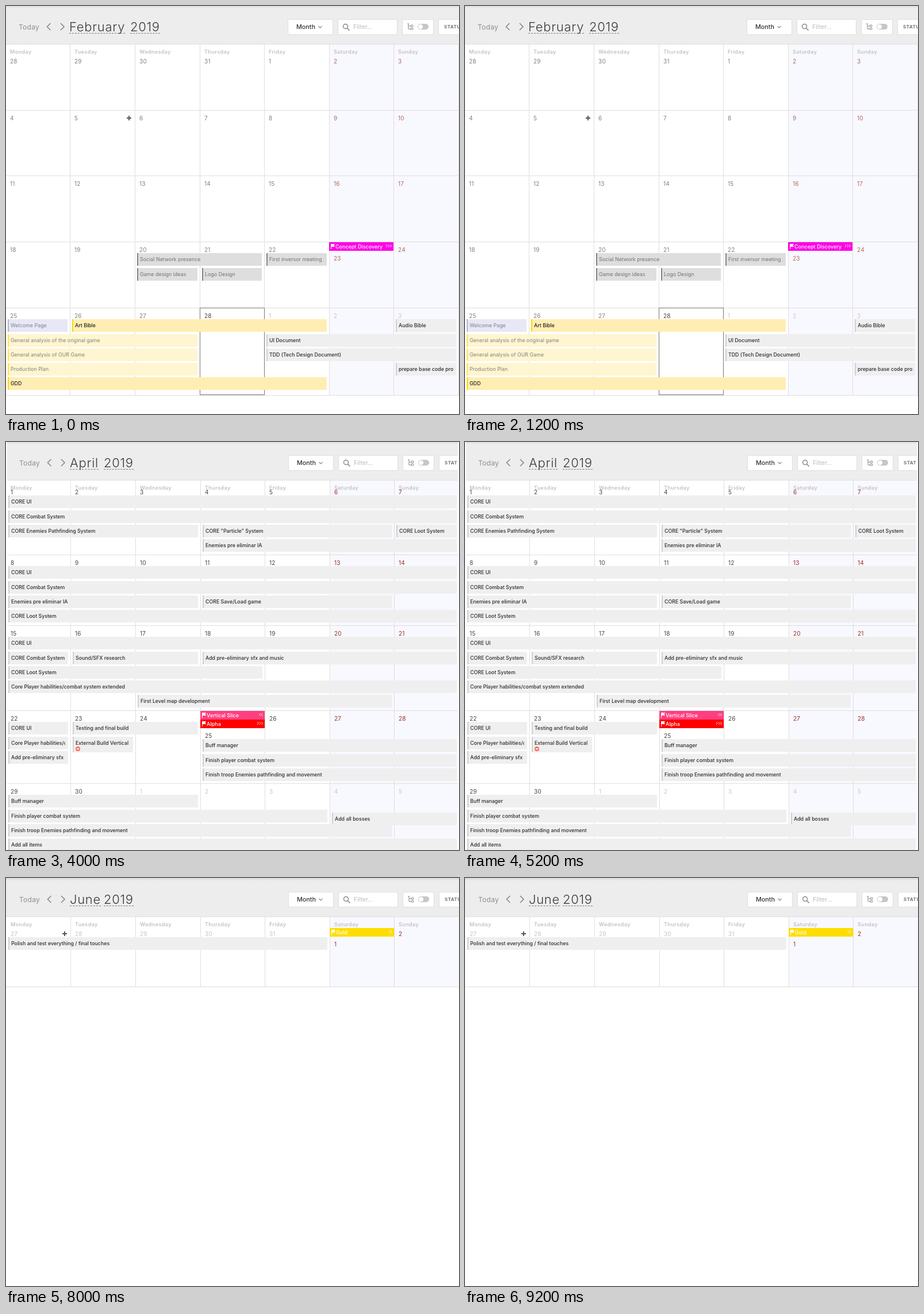
Write an HTML page that moves like this. It is 788 by 710 pixels and loops after 10 s.

```html
<!DOCTYPE html>
<html lang="en">
<head>
<meta charset="utf-8">
<title>Project calendar</title>
<style>
  html, body { margin: 0; width: 100%; height: 100%; overflow: hidden; background: #fff; }
  #stage { position: relative; width: 788px; height: 710px; overflow: hidden;
    font: 500 8.8px Inter, Lato, sans-serif; }
  #stage div { position: absolute; box-sizing: border-box; white-space: nowrap; }
  .month { width: 788px; height: 710px; visibility: hidden; }
  .head { background: linear-gradient(#d6d6d6, #ededed 6px); }
  .head svg { position: absolute; left: 2px; top: 2px; overflow: visible; }
  .title { font-size: 22px; font-weight: 300; letter-spacing: .7px; line-height: 22px;
    color: #3c3c3c; border-bottom: 1px dashed #777; }
  .line { background: #dfdfdf; }
  .weekend { background: #f8f8ff; }
  .today { border: 1px solid #777; }
  .day { font-size: 9px; font-weight: 600; letter-spacing: .4px; line-height: 16px; color: #c2c2c2; }
  .date { font-size: 10px; font-weight: 400; letter-spacing: .2px; line-height: 16px; }
  .bar { padding: 0 5px 0 3px; border-left: 2px solid #d0d0d0; background: #efefef;
    color: #2c2c2c; line-height: 22px; }
  .bar span { display: block; overflow: hidden; }
  .past, .idea, .done { font-weight: 400; letter-spacing: .05px; }
  .past { background: #dedede; border-color: #858585; color: #707070; }
  .idea { background: #e8e7f5; border-color: #b4b4d8; color: #808088; }
  .done { background: #fff5d0; border-color: #ffe14d; color: #808080; }
  .now { background: #ffeeb3; border-color: #ffd900; color: #222; }
  .dot { width: 8px; height: 8px; border-radius: 50%; }
  .dot::after { content: ""; position: absolute; left: 2px; top: 3px; width: 4px; height: 2px; background: #fff; }
  .flag { color: #fff; font-size: 9px; line-height: 15px; padding-left: 11px; }
  .flag svg { position: absolute; left: 3px; top: 3px; }
  .flag i { position: absolute; right: 3px; top: -1px; font: 11px/15px Inter, sans-serif;
    letter-spacing: -.6px; opacity: .75; }
  .plus { width: 8px; height: 8px;
    background: linear-gradient(#555, #555) 0 3px / 8px 2px no-repeat,
      linear-gradient(#555, #555) 3px 0 / 2px 8px no-repeat; }
</style>
</head>
<body>
<div id="stage"></div>
<script>
const DAYS = ['Monday', 'Tuesday', 'Wednesday', 'Thursday', 'Friday', 'Saturday', 'Sunday'];
const TODAY = new Date(2019, 1, 28);
const PINK = '#ff3f80', RED = '#ff0000', GOLD = '#ffdd00', MAGENTA = '#ff00e6';
const HOLD = 2000, ROW = 25.2;

// Each string is one row of bars: "first-end[+shift] [#style] label", split by "|".
const turnOfMonth = [
  '0-1 #idea Welcome Page|1-5 #now Art Bible|6-7 Audio Bible',
  '0-3 #done General analysis of the original game|4-7 UI Document',
  '0-3 #done General analysis of OUR Game|4-7 TDD (Tech Design Document)',
  '0-3 #done Production Plan|6-7 prepare base code project',
  '0-5 #now GDD'];

const months = [
  { name: 'February', yearX: 216, tops: [66, 181, 295, 410, 525, 677], plus: [1, 1],
    weeks: [[], [], [], [
      '2-4 #past Social Network presence|4-5 #past First inversor meeting ;',
      '2-3 #past Game design ideas|3-4 #past Logo Design'], turnOfMonth],
    flags: [[3, 5, 'Concept Discovery', MAGENTA, '›››']] },

  { name: 'March', yearX: 184, tops: [66, 230, 355, 468, 591, 720],
    weeks: [turnOfMonth, [
      '0-1 UI Document|1-4 QA Plan|4-7 Prepare slateFolio for pitch',
      '0-4 TDD (Tech Design Document)',
      '0-2 Audio Bible',
      '0-7 prepare base code project'], [
      '0-1 prepare base code project|1-4+15 Isometric Drawing System|6-7+15 Player Movement/Core System',
      '0-1 Concept discovery Pitch|1-6+15 Load / Unload Map System|6-7+15 CORE UI',
      '1-7+15 Extended Entity Factory'], [
      '0-1 Extended Entity Factory|1-4 GAMEPAD support|4-6 CORE Camera system',
      '0-3 Player Movement/Core System|3-7 CORE Combat System',
      '0-7 CORE UI',
      '1-7 CoreCollision System'], [
      '0-7 CORE UI',
      '0-2 CoreCollision System',
      '0-7 CORE Combat System',
      '1-7 CORE Enemies Pathfinding System']],
    flags: [[1, 6, 'Concept Discovery', MAGENTA, '‹‹‹'], [2, 1, 'Vertical Slice', PINK, '›››']] },

  { name: 'April', yearX: 169, tops: [66, 196, 319, 467, 594, 720], pad: 7,
    dx: 1, clip: 'inset(0 3px 0 1px)',
    weeks: [[
      '0-7 CORE UI',
      '0-7 CORE Combat System',
      '0-3 CORE Enemies Pathfinding System|3-6 CORE "Particle" System|6-7 CORE Loot System',
      '3-7 Enemies pre eliminar IA'], [
      '0-7 CORE UI',
      '0-7 CORE Combat System',
      '0-3 Enemies pre eliminar IA|3-6 CORE Save/Load game',
      '0-7 CORE Loot System'], [
      '0-7 CORE UI',
      '0-1 CORE Combat System|1-3 Sound/SFX research|3-7 Add pre-eliminary sfx and music',
      '0-4 CORE Loot System',
      '0-7 Core Player habilities/combat system extended',
      '2-6 First Level map development'], [
      '0-1 CORE UI|1-3 Testing and final build|3-7+30 Buff manager',
      '0-1 Core Player habilities/combat system extended|1-2 #stop External Build Vertical Slice|3-7+30 Finish player combat system',
      '0-1 Add pre-eliminary sfx and music|3-7+30 Finish troop Enemies pathfinding and movement'], [
      '0-3 Buff manager',
      '0-5 Finish player combat system|5-7+5 Add all bosses',
      '0-6 Finish troop Enemies pathfinding and movement',
      '0-7 Add all items']],
    flags: [[3, 3, 'Vertical Slice', PINK, '‹‹'], [3, 3, 'Alpha', RED, '›››']] },

  { name: 'May', yearX: 161, tops: [66, 230, 384, 512, 624, 720], plus: [1, 0],
    dx: 1, clip: 'inset(0 0 0 1px)',
    weeks: [[
      '0-3 Buff manager|5-7 Add all bosses',
      '0-5 Finish player combat system',
      '0-6 Finish troop Enemies pathfinding and movement',
      '0-7 Add all items',
      '2-7 Add camera focus'], [
      '0-1 Add all items|1-5 Save and load game system|6-7 Finish map/load',
      '0-3 Add all bosses|3-7 Cut-Scene manager',
      '1-7 UI - Finish all usability',
      '2-6 Add remaining Art/sound assets',
      '3-7 #warn Finish particle system'], [
      '0-4 UI - Finish all usability|6-7+30 Cinematic logo intro',
      '0-2 #warn Finish particle system|6-7+30 Polish and test everything',
      '0-3+6 Finish map/load',
      '1-4+6 Add all three levels'], [
      '0-3 Cinematic logo intro',
      '0-7 Polish and test everything'], [
      '0-5 Polish and test everything']],
    flags: [[2, 6, 'Alpha', RED, '‹‹‹'], [2, 6, 'Gold', GOLD, '›‹'], [4, 5, 'Gold', GOLD, '‹‹‹']] },

  { name: 'June', yearX: 169, tops: [66, 188], plus: [0, 0], dx: 1, dy: 1,
    weeks: [['0-5 Polish and test everything / final touches']],
    flags: [[0, 5, 'Gold', GOLD, '‹›']] }
];

const colX = c => Math.round(112.6 * c - 1.2);
const px = v => v === '' ? 'auto' : v + 'px';
const box = (cls, x, y, w, h, html = '', css = '') =>
  `<div class="${cls}" style="left:${px(x)};top:${px(y)};width:${px(w)};height:${px(h)};${css}">${html}</div>`;

const button = (x, w) => `<rect x="${x}.5" y="23.5" width="${w}" height="26" fill="#fff" stroke="#e2e2e2"/>`;
const controls = `<svg width="788" height="66" fill="none" stroke="#888" stroke-width="1.2">
  <path d="M77.5 30l-6 6 6 6M95 30l6 6-6 6" stroke-width="1.6"/>
  ${button(490, 78)}${button(577, 103)}${button(689, 54)}${button(752, 60)}
  <path d="M543.5 35l3 3 3-3"/>
  <circle cx="590.5" cy="35.5" r="4" stroke-width="1.5"/><path d="M593.5 38.5l4 4" stroke-width="1.7"/>
  <path d="M698 31h3M700 31v9h4M700 35h4" stroke-width="1"/>
  <rect x="704" y="33" width="4" height="3" rx="1" stroke-width="1"/>
  <rect x="704" y="38" width="4" height="3" rx="1" stroke-width="1"/>
  <rect x="716" y="31" width="19" height="10" rx="5" fill="#c6c6c6" stroke="none"/>
  <circle cx="721" cy="36" r="4" fill="#fff" stroke="none"/>
  <g stroke="none">
    <text x="22" y="41" font-size="12" font-weight="400" letter-spacing=".3" fill="#8e8e8e">Today</text>
    <text x="505" y="40" font-size="10.8" fill="#333">Month</text>
    <text x="604" y="40" font-size="10.5" font-weight="400" fill="#bbb">Filter...</text>
    <text x="762" y="39" font-size="8" font-weight="700" letter-spacing=".5" fill="#777">STATUS</text>
  </g></svg>`;
const flagIcon = `<svg width="7" height="9" fill="#fff"><path d="M0 0h1v9H0zM1 0h6l-1.5 2.5L7 5H1z"/></svg>`;

function dateColor(date, month) {
  const weekend = date.getDay() % 6 === 0;
  if (date.getMonth() !== month && date > TODAY) return '#c6c6c6';
  if (date < TODAY || date.getMonth() !== month) return weekend ? '#b06a58' : '#808080';
  return weekend ? '#962f2a' : '#444';
}

function drawBar(item, y) {
  const [, from, to, shift = 0, style = '', label] =
    item.match(/^(\d)-(\d)(?:\+(\d+))?(?: #(\w+))? (.+)$/);
  const x = colX(+from) + 4, top = Math.ceil(y) + +shift;
  const dot = { stop: '#ff6b5e', warn: '#ffd800' }[style];
  return box('bar ' + style, x, top, colX(+to) - 4 - x, dot ? 27 : 22, `<span>${label}</span>`) +
    (dot ? box('dot', x + 5, top + 17, 8, 8, '', 'background:' + dot) : '');
}

function drawMonth({ name, yearX, tops, weeks, flags, plus, pad = 16, dx = 0, dy = 0, clip = 'none' }, i) {
  const month = i + 1, bottom = tops[weeks.length];
  const offset = (new Date(2019, month, 1).getDay() + 6) % 7;
  let back = box('weekend', colX(5), 66, colX(7) - colX(5), bottom - 66), front = '';
  for (let c = 1; c < 8; c++) back += box('line', colX(c), 66, 1, bottom - 66);
  for (const top of tops) back += box('line', -2, top, 792, 1);
  DAYS.forEach((day, c) => front += box('day', colX(c) + 8, 72, '', 16, day));

  weeks.forEach((rows, w) => {
    const base = tops[w] + (w ? 0 : pad);
    for (let c = 0; c < 7; c++) {
      const date = new Date(2019, month, 1 - offset + w * 7 + c);
      const marks = flags.filter(f => f[0] === w && f[1] === c);
      const flagY = base + (w ? 1 : 4);
      const y = marks.length ? flagY + 15 * marks.length + 13 : base + 14;
      front += box('date', colX(c) + 8, y - 8, '', 16, date.getDate(), 'color:' + dateColor(date, month));
      marks.forEach(([, , text, color, arrows], n) => front += box('flag', colX(c), flagY + 15 * n,
        colX(c + 1) - colX(c), 15, `${flagIcon}${text}<i>${arrows}</i>`, 'background:' + color));
      if (+date === +TODAY)
        back += box('today', colX(c), tops[w], colX(c + 1) - colX(c) + 1, tops[w + 1] - tops[w]);
    }
    rows.forEach((row, r) => row.split('|').forEach(item => front += drawBar(item, base + 20 + r * ROW)));
  });

  if (plus) {
    const [w, c] = plus;
    front += box('plus', colX(c + 1) - 14, tops[w] + (w ? 0 : pad) + 10, 8, 8);
  }
  const head = box('head', -2, -2, 792, 68, controls) +
    box('title', 110, 25, '', 23, name) + box('title', yearX, 25, '', 23, '2019');
  return box('month', dx, dy, 788, 710, head + back + front, 'clip-path:' + clip);
}

const stage = document.getElementById('stage');
stage.innerHTML = months.map(drawMonth).join('');
const pages = [...stage.children];
const start = performance.now();

function tick() {
  const current = Math.floor((performance.now() - start) / HOLD) % pages.length;
  pages.forEach((page, i) => page.style.visibility = i === current ? 'visible' : 'hidden');
  requestAnimationFrame(tick);
}
tick();
</script>
</body>
</html>
```
